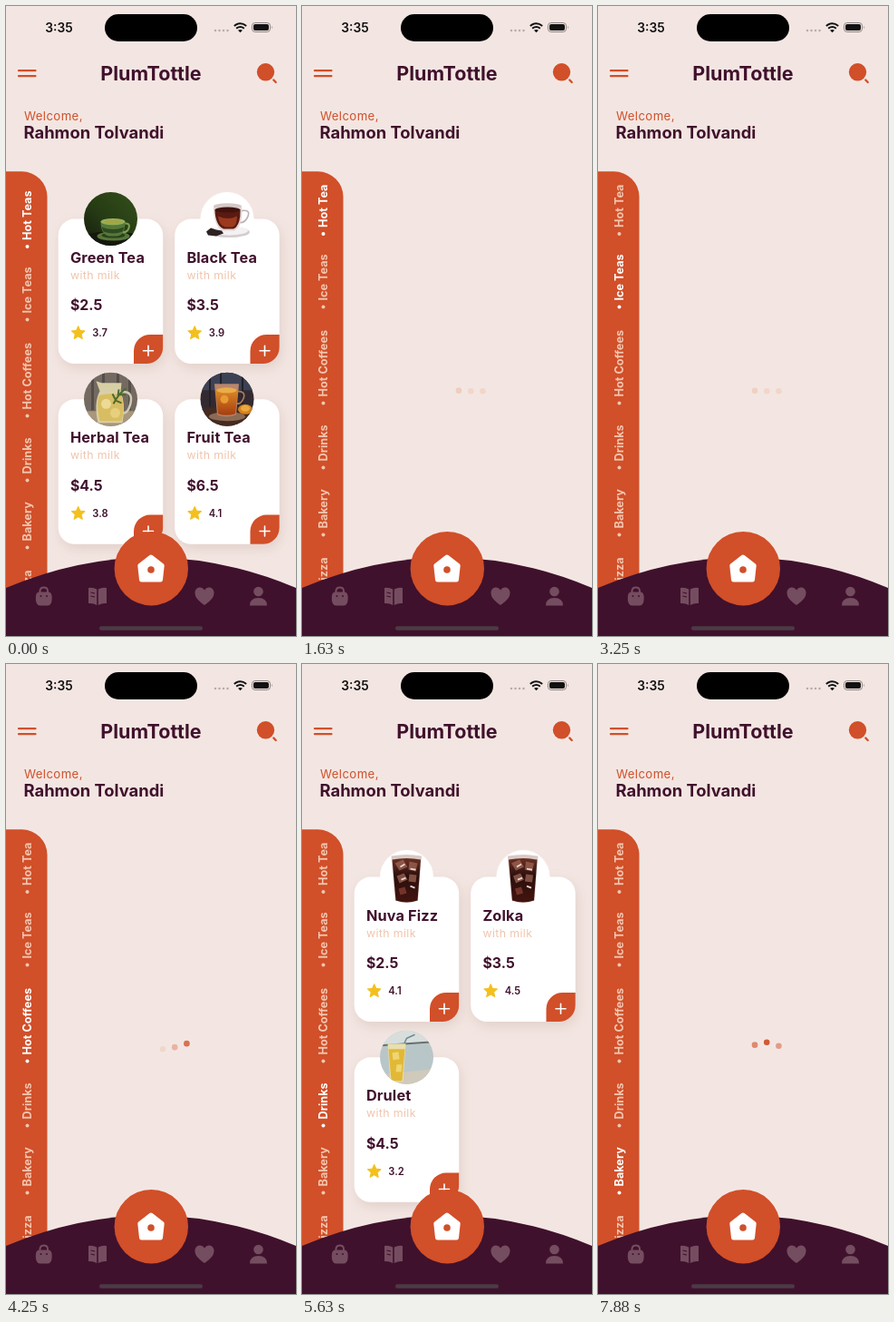
Animation of 320 by 694 pixels, one loop 8000 ms. Source, as an HTML page:

```html
<!DOCTYPE html>
<html lang="en">
<head>
<meta charset="utf-8">
<title>Coffee shop app</title>
<style>
html, body { margin: 0; width: 100%; height: 100%; overflow: hidden; background: #f3e6e2; }
svg { display: block; width: 100%; height: 100%; font-family: Inter, "Open Sans", sans-serif; }
.bold { font-weight: 700; fill: #40112c; }
.airy { letter-spacing: .4px; }
.card { filter: drop-shadow(2px 5px 7px rgba(110, 50, 30, .12)); }
</style>
</head>
<body>
<svg id="stage" viewBox="0 0 320 694" preserveAspectRatio="none">
  <defs>
    <clipPath id="round"><circle r="29.5"/></clipPath>
    <clipPath id="list"><rect y="196" width="46" height="470"/></clipPath>
    <linearGradient id="leafy" x1="1" y1="0" x2="0" y2="1">
      <stop stop-color="#34501b"/><stop offset=".55" stop-color="#263b14"/><stop offset="1" stop-color="#141a0c"/>
    </linearGradient>
    <linearGradient id="amber" x1="0" y1="0" x2="0" y2="1">
      <stop stop-color="#dc8a26"/><stop offset="1" stop-color="#a63d10"/>
    </linearGradient>
    <linearGradient id="cola" x1="0" y1="0" x2="0" y2="1">
      <stop stop-color="#6b3023"/><stop offset=".4" stop-color="#2a0f0d"/><stop offset="1" stop-color="#43140f"/>
    </linearGradient>

    <g id="green">
      <rect x="-30" y="-30" width="60" height="60" fill="url(#leafy)"/>
      <path d="M-30 17Q0 11 30 17V30H-30Z" fill="#15180e"/>
      <ellipse cx="3" cy="19" rx="18" ry="5" fill="#56773a"/>
      <ellipse cx="3" cy="18" rx="13" ry="3" fill="#2a411a"/>
      <path d="M14 5q8-1 6 5t-9 4" fill="none" stroke="#7c9f52" stroke-width="2"/>
      <path d="M-11 3H16Q16 18 7 19H-2Q-11 17-11 3Z" fill="#54793a"/>
      <path d="M-10 9Q3 14 15 9L13 14Q3 18-8 14Z" fill="#30491f"/>
      <ellipse cx="2.5" cy="3" rx="13.5" ry="3.700" fill="#93b35f"/>
      <ellipse cx="2.5" cy="3.400" rx="11" ry="2.400" fill="#a3a645"/>
    </g>
    <g id="black">
      <rect x="-30" y="-30" width="60" height="60" fill="#fff"/>
      <ellipse cx="2" cy="14.500" rx="23" ry="6" fill="#d3ced0"/>
      <ellipse cx="2" cy="13" rx="21" ry="4.800" fill="#f4f1f2"/>
      <path d="M15-9q11-2 8 6t-11 7" fill="none" stroke="#bdb0b4" stroke-width="1.600"/>
      <path d="M-15-14H16Q18 8 8 13H-5Q-15 8-15-14Z" fill="#e2d5d3"/>
      <path d="M-13.500-10H14.500Q15 7 7 11H-4Q-13 7-13.500-10Z" fill="#5a1a12"/>
      <path d="M-10-3Q1 2 11-3Q11 7 6 9H-2Q-9 7-10-3Z" fill="#9c3a1c"/>
      <ellipse cx=".5" cy="-14" rx="15.500" ry="3.300" fill="#d6c8c7"/>
      <ellipse cx=".5" cy="-10" rx="14" ry="3" fill="#40130f"/>
      <path d="M-23 14l5-4 6 2 6 1 2 3-8 3-9-1Z" fill="#2d2222"/>
    </g>
    <g id="herbal">
      <rect x="-30" y="-30" width="60" height="60" fill="#746a61"/>
      <path d="M-20-30V12M-8-30V12M8-30V12M21-30V12" stroke="#544d4a" stroke-width="3"/>
      <rect x="-30" y="13" width="60" height="18" fill="#a9977c"/>
      <path d="M11-8q14-2 11 12t-12 11" fill="none" stroke="#cfcbb3" stroke-width="2.500"/>
      <path d="M-16-20L-10-18H12L11-8Q17 5 13 26H-14Q-19 4-12-9Z" fill="#d9cfa6"/>
      <path d="M-13-4Q0-8 12-4Q16 8 12 24H-12Q-16 8-13-4Z" fill="#d8bd62"/>
      <circle cx="-5" cy="5" r="5.500" fill="#ecdb95"/><circle cx="5" cy="15" r="5.500" fill="#e6d07d"/>
      <path d="M3 5Q9-7 17-12M8-4l1-7M10-5l7 0M5 1l7 3M5 0l-3-6" fill="none" stroke="#4d6a30" stroke-width="2"/>
    </g>
    <g id="fruit">
      <rect x="-30" y="-30" width="60" height="60" fill="#332a31"/>
      <path d="M-30-30H30V-10H-30Z" fill="#3c4254"/>
      <path d="M-19-30V8M-7-30V8M17-30V8" stroke="#241f26" stroke-width="2"/>
      <path d="M-30 11Q0 6 30 11V30H-30Z" fill="#452a20"/>
      <ellipse cx="0" cy="19" rx="20" ry="5" fill="#8c6b55"/>
      <ellipse cx="20" cy="11" rx="8" ry="5.500" fill="#d5821f"/><ellipse cx="20" cy="10" rx="5" ry="3.500" fill="#eda93c"/>
      <path d="M11-9q10 0 7 8t-9 5" fill="none" stroke="#a67a5e" stroke-width="1.800"/>
      <path d="M-14-17H13L10 17Q-1 21-11 17Z" fill="#b9866c"/>
      <path d="M-13-11H12L9 16Q-1 19-10 16Z" fill="url(#amber)"/>
      <ellipse cx="-.5" cy="-10" rx="11" ry="3" fill="#e9ad4a"/>
      <circle cx="-3" cy="0" r="4.500" fill="#e89a34"/>
    </g>
    <g id="dark">
      <rect x="-30" y="-30" width="60" height="60" fill="#fff"/>
      <path d="M-17-23Q0-26 16.500-23L12.500 26Q0 31-12.500 26Z" fill="#d8cac6"/>
      <path d="M-16-19Q0-22 15.500-19L12 26Q0 30-12 26Z" fill="url(#cola)"/>
      <path d="M-13-15l9-4 5 8-9 4ZM3-17l9 2-2 9-8-2ZM-11-1l8-3 4 7-9 4ZM3-3l8 1-1 8-8-1Z" fill="#a56a59" opacity=".7"/>
      <path d="M-9 13l7-2 2 7-7 2Z" fill="#8a4436" opacity=".7"/>
      <path d="M-7-11l5-3M4-9l6 1M-6 3l5-2M4 10l5 2" stroke="#ead7d0" stroke-width="1.700"/>
    </g>
    <g id="lemon">
      <rect x="-30" y="-30" width="60" height="60" fill="#b9c6c8"/>
      <path d="M-30-30H30V-17L-30-13Z" fill="#d8dedc"/>
      <path d="M-30-13L30-17" stroke="#67706e" stroke-width="2"/>
      <path d="M-30 19L30 13V30H-30Z" fill="#cfcabb"/>
      <path d="M-6-8L0-21L9-25" fill="none" stroke="#6e8791" stroke-width="1.500"/>
      <path d="M-21-15H-1L-4 27H-18Z" fill="#e8dfae"/>
      <path d="M-20-9H-2L-5 26H-17Z" fill="#e2b936"/>
      <path d="M-16-5l7-1 1 8-7 1ZM-11 8l6 0-1 8-6 0Z" fill="#f0d671"/>
    </g>
  </defs>

  <rect width="320" height="694" fill="#f3e6e2"/>

  <!-- status bar -->
  <text x="43.300" y="29" font-size="13.800" font-weight="600" fill="#111">3:35</text>
  <rect x="109" y="9" width="102" height="30" rx="15"/>
  <path d="M231 27h14" stroke="#b8acaa" stroke-width="2.600" stroke-linecap="round" stroke-dasharray="0 4.500"/>
  <path d="M251.800 22Q258.500 16.500 265.200 22M254.200 24.700Q258.500 21.300 262.800 24.700" fill="none" stroke="#111" stroke-width="2"/>
  <path d="M256 26.800Q258.500 25 261 26.800L258.500 29.200Z" fill="#111"/>
  <rect x="271.500" y="18.500" width="20" height="10" rx="3.300" fill="none" stroke="#8f8584"/>
  <rect x="273" y="20" width="17" height="7" rx="2" fill="#111"/>
  <path d="M293 21.800q1.500 1.700 0 3.400Z" fill="#8f8584"/>

  <!-- header -->
  <path d="M14 71.200H32.500M14 77.200H32.500" stroke="#d14f29" stroke-width="2.200" stroke-linecap="round"/>
  <text class="bold" x="160" y="81.500" font-size="21.500" text-anchor="middle">PlumTottle</text>
  <circle cx="286.500" cy="72.800" r="9.700" fill="#d14f29"/>
  <path d="M295.300 81.500L297.700 84" stroke="#d14f29" stroke-width="2.400" stroke-linecap="round"/>
  <text class="airy" x="20" y="126" font-size="13.200" fill="#d14f29">Welcome,</text>
  <text class="bold" x="19.500" y="145.500" font-size="18.400">Rahmon Tolvandi</text>

  <!-- categories -->
  <path d="M0 182.300H17.500A28 28 0 0 1 45.500 210.300V694H0Z" fill="#d14f29"/>
  <g clip-path="url(#list)"><g id="tabs" font-weight="700"></g></g>

  <g id="pages"></g>
  <g id="dots"></g>

  <!-- bottom bar -->
  <path d="M0 641Q160 574 320 641V694H0Z" fill="#40112c"/>
  <g fill="#754d60">
    <path d="M36.500 645.500H47Q50.700 645.500 50.700 652Q50.700 660.500 46 660.500H37.500Q32.800 660.500 32.800 652Q32.800 645.500 36.500 645.500Z"/>
    <path d="M37.500 647V644Q38 640.500 41.800 640.500T46 644V647" fill="none" stroke="#754d60" stroke-width="2"/>
    <path d="M91 641Q96 640 100.200 642.500V660Q96 657.500 91 658ZM101.800 642.500Q106 640 111 641V658Q106 657.500 101.800 660Z"/>
    <path d="M219 660C212 655 208.500 651.500 208.500 646.500C208.500 640 216 638.500 219 643.500C222 638.500 229.500 640 229.500 646.500C229.500 651.500 226 655 219 660Z"/>
    <circle cx="278.500" cy="645" r="5.300"/>
    <path d="M269 660.500Q269 652 278.500 652T288 660.500Z"/>
  </g>
  <path d="M93.500 646L98 647M93.500 650L98 651" stroke="#40112c" stroke-width="1.200"/>
  <circle cx="38.500" cy="650" r="1" fill="#40112c"/>
  <circle cx="45" cy="650" r="1" fill="#40112c"/>
  <circle cx="160.300" cy="619.700" r="40.700" fill="#d14f29"/>
  <path d="M160 607L172.200 616.500L170.500 632H149.500L147.800 616.500Z" fill="#fff" stroke="#fff" stroke-width="5" stroke-linejoin="round"/>
  <circle cx="160" cy="621" r="3.800" fill="#d14f29"/>
  <rect x="103" y="683.300" width="114" height="4.400" rx="2.200" fill="#4b3b45"/>
</svg>
<script>
const LOOP = 8000, JUMP = 455, HEIGHT = 8;
const $ = id => document.getElementById(id);

// label and the y where its text starts, list at rest
const tabs = [["Hot Teas", 258], ["Ice Teas", 338.5], ["Hot Coffees", 444.5],
  ["Drinks", 515.5], ["Bakery", 589.5], ["Pizza", 655]];

const teas = ["Green Tea", "Black Tea", "Herbal Tea", "Fruit Tea"];
const teaPics = ["green", "black", "herbal", "fruit"];
const pages = [
  { from: 0, to: 1625, names: teas, pics: teaPics, rates: ["3.7", "3.9", "3.8", "4.1"] },
  { from: 2740, to: 3248, names: teas, pics: teaPics, rates: ["4.2", "3.3", "4.4", "4.4"] },
  { from: 5620, to: 7248, names: ["Nuva Fizz", "Zolka", "Drulet"],
    pics: ["dark", "dark", "lemon"], rates: ["4.1", "4.5", "3.2"] }
];
const prices = ["2.5", "3.5", "4.5", "6.5"];
const loads = [1600, 3230, 4490, 7230];
const picks = [0, 1740, 3370, 4620, 7370];

function star(x, y, r) {
  const pts = Array.from({ length: 10 }, (_, i) => {
    const a = i * Math.PI / 5, k = i % 2 ? r * .47 : r;
    return (x + k * Math.sin(a)).toFixed(2) + "," + (y - k * Math.cos(a)).toFixed(2);
  });
  return `<polygon points="${pts.join(" ")}" fill="#f3c01c" stroke="#f3c01c" stroke-linejoin="round"/>`;
}

function card(page, name, i) {
  const x = 57.7 + i % 2 * 128.5, y = 234.6 + (i >> 1) * 198.7;
  return `<g transform="translate(${x} ${y})">
    <rect class="card" width="115.500" height="159.500" rx="18" fill="#fff"/>
    <g transform="translate(57.800 0)" clip-path="url(#round)"><use href="#${page.pics[i]}"/></g>
    <text class="bold" x="13.200" y="48" font-size="16.300" letter-spacing=".15">${name}</text>
    <text class="airy" x="13.300" y="66" font-size="12.300" fill="#f0c4ac">with milk</text>
    <text class="bold" x="13.300" y="100.500" font-size="15.800">$${prices[i]}</text>
    ${star(22, 125.800, 7.800)}
    <text class="bold" x="37.600" y="129.700" font-size="11.200" style="font-weight:600">${page.rates[i]}</text>
    <path d="M115.500 127.300V141.500A18 18 0 0 1 97.500 159.500H83.300V145.300A18 18 0 0 1 101.300 127.300Z" fill="#d14f29"/>
    <path d="M93.800 145.200H104.800M99.300 139.700V150.700" stroke="#fff" stroke-width="1.600" stroke-linecap="round"/>
  </g>`;
}

$("tabs").innerHTML = tabs.map(([name, y]) => `<g><circle cx="23.500" cy="${y + 7}" r="2"/>
  <text transform="translate(28.200 ${y}) rotate(-90)" font-size="12.700">${name}</text></g>`).join("");
$("pages").innerHTML = pages.map(p => `<g>${p.names.map((n, i) => card(p, n, i)).join("")}</g>`).join("");
$("dots").innerHTML = [173, 186.2, 199.4].map(x => `<circle cx="${x}" r="3.300"/>`).join("");

const clamp = v => Math.max(0, Math.min(1, v));
const lastIndex = (times, t) => times.filter(s => s <= t).length - 1;
const pale = [241, 214, 202], full = [209, 79, 41];
const mix = k => `rgb(${pale.map((v, i) => Math.round(v + (full[i] - v) * k))})`;

function render(t) {
  const scroll = 14 * (1 - (1 - clamp((t - 485) / 765)) ** 3);
  $("tabs").setAttribute("transform", `translate(0 ${-scroll})`);

  const active = lastIndex(picks, t);
  [...$("tabs").children].forEach((el, i) => el.setAttribute("fill", i === active ? "#fff" : "#f2c5ae"));

  let loading = true;
  pages.forEach((p, i) => {
    const on = t >= p.from && t < p.to;
    if (on) loading = false;
    $("pages").children[i].style.display = on ? "" : "none";
  });

  $("dots").style.display = loading ? "" : "none";
  const since = t - loads[Math.max(0, lastIndex(loads, t))];
  [...$("dots").children].forEach((dot, i) => {
    const lift = clamp(1 - Math.abs(since / JUMP - 1 - i / 2));
    dot.setAttribute("cy", 424.2 - HEIGHT * lift);
    dot.setAttribute("fill", mix(lift));
  });
}

const start = performance.now();
function tick() {
  render((performance.now() - start) % LOOP);
  requestAnimationFrame(tick);
}
tick();
</script>
</body>
</html>
```
